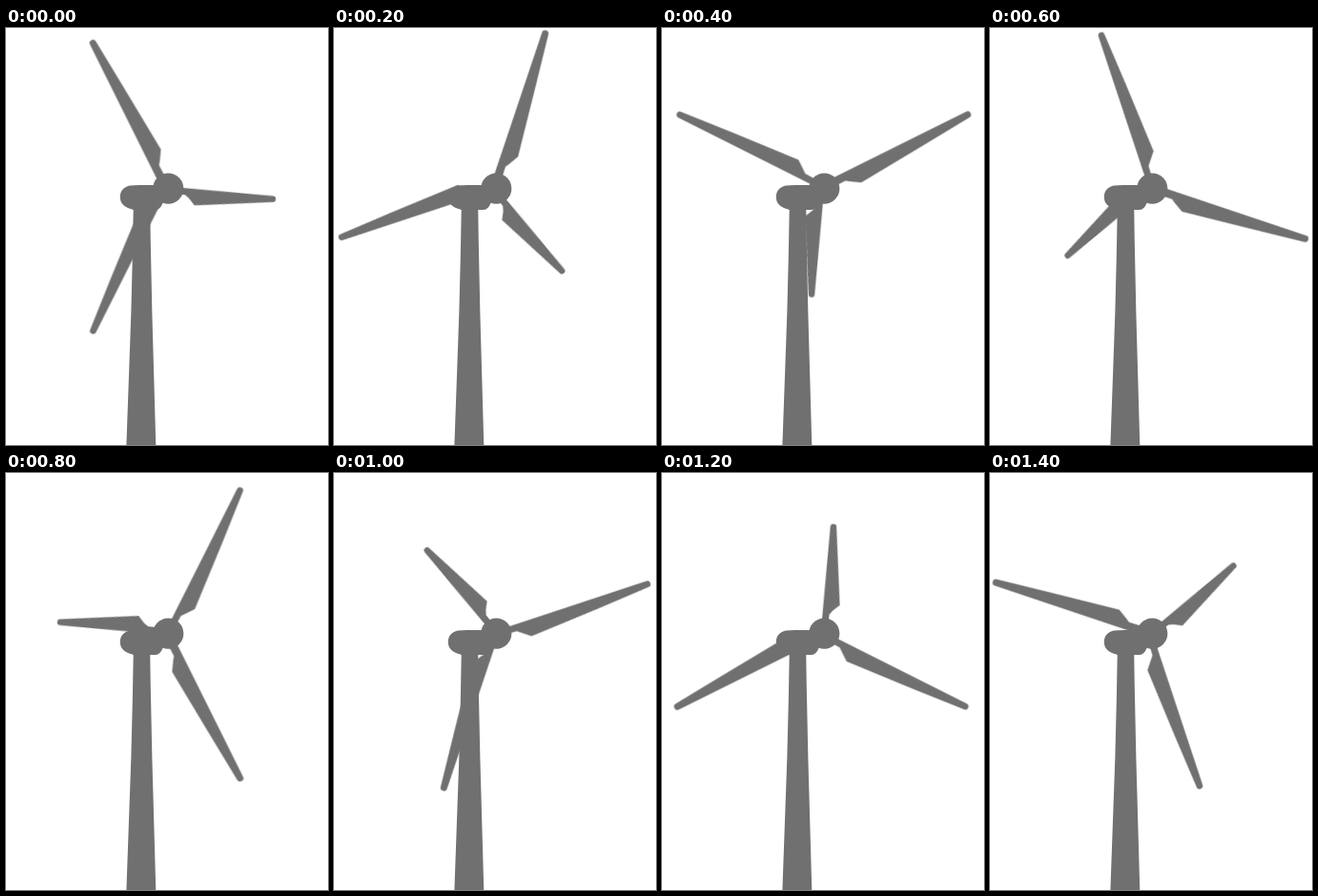
An HTML page that plays this animation: 338x438 px, repeating every 1.6 s.

```html
<!DOCTYPE html>
<html lang="en">
<head>
<meta charset="utf-8">
<title>Wind turbine</title>
<style>
  html, body {
    margin: 0;
    width: 100%;
    height: 100%;
    overflow: hidden;
    background: #fff;
  }
  svg {
    display: block;
    width: 100%;
    height: 100%;
    fill: #707070;
  }
  /* one clockwise turn in eight hard steps */
  .rotor {
    transform-origin: 168.5px 168.2px;
    animation: spin 1.6s steps(8, end) infinite;
  }
  @keyframes spin {
    from { transform: rotate(0deg); }
    to { transform: rotate(360deg); }
  }
</style>
</head>
<body>
<svg viewBox="0 0 338 438">
  <path class="tower" d="M133.8 186L132.8 240L131.3 300L126.4 438H157.3L153.4 300L151.7 220L151.2 186Z"/>
  <path class="nacelle" d="M130 165.6C123 167 119.6 172 119.8 178C120 185 125 188.5 134 191H157Q162 190.5 164.5 184L168 168L154 165H140Z"/>
  <g class="rotor">
    <!-- each blade lies along +x from the axle, then turns into place -->
    <g transform="translate(168.5 168.2)">
      <path transform="rotate(-116.9)" d="M12 -4.6L170.8 -3.4A3.5 3.5 0 0 1 170.8 3.6L110 8.2L39 13.2L29.5 7.2L25 4L12 4.2Z"/>
      <path transform="rotate(117.1)" d="M12 -2L168.4 -3.1A3.4 3.4 0 0 1 168.4 3.7L110 9L36 15L26.5 8L23 5.2L12 5Z"/>
      <path transform="rotate(6)" d="M12 -2L112 -3.5A3.3 3.3 0 0 1 112 3.1L31 15L24.4 8L20 5L12 5Z"/>
    </g>
  </g>
  <circle class="hub" cx="170.3" cy="168.6" r="16.1"/>
</svg>
</body>
</html>
```
